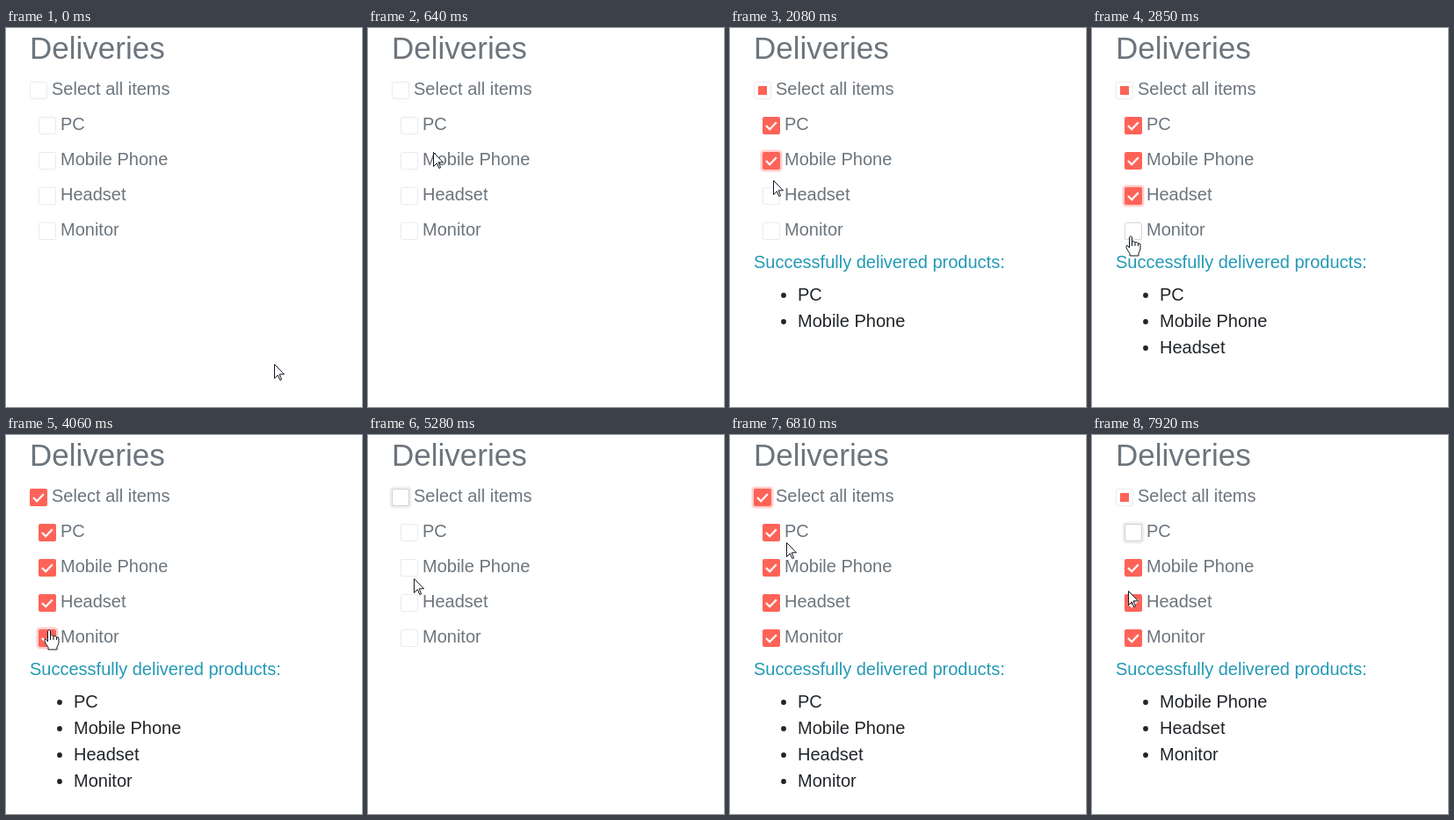
Recreate the animation shown at these times as an HTML page. Size 405 by 431 pixels, loop 8 s.

```html
<!DOCTYPE html>
<html lang="en">
<head>
<meta charset="utf-8">
<title>Deliveries</title>
<style>
  html, body { margin: 0; width: 100%; height: 100%; overflow: hidden; background: #fff; }
  svg { display: block; font: 20px "Liberation Sans", Arial, sans-serif; }
</style>
</head>
<body>
<svg id="stage" width="405" height="431" viewBox="0 0 405 431"></svg>
<script>
const LOOP = 8000, TICK = 110;
const GREY = '#6c757d', INFO = '#2399b5', DARK = '#212529', ACCENT = '#ff6358';
const ITEMS = ['PC', 'Mobile Phone', 'Headset', 'Monitor'];
const [ALL, PC, MOBILE, HEADSET, MONITOR] = [0, 1, 2, 3, 4];
const LEFT = 27, BOX = 20;

const ARROW = 'M.5.5V16.5L4.3 12.7 6.8 18.5 8.6 17.7 6.2 11.8H11.5Z';
const HAND = 'M-1.5 1.8Q0-.6 1.5 1.8V7Q4 5.5 5 8 7.5 6.5 8.5 9 11 8 11 11V15Q10.5 18 9 20V23H-1V20.5' +
  'Q-4 16.5-5 13.5-5.5 10.5-3.5 11.5L-1.5 14ZM1.5 7V12M5 8V12M8.5 9V12';

const boxOrigin = row => [row === ALL ? LEFT : LEFT + 10, 61 + 40 * row];

function inBox(row, dx = 10, dy = 12) {
  const [x, y] = boxOrigin(row);
  return [x + dx, y + dy];
}

// The script of the demo: pointer moves, clicks and pauses, one after another.
const moves = [], clicks = [];
let clock = 0, pointer = [305, 382];

const wait = ms => { clock += ms; };
const click = row => clicks.push({ time: clock, row });
function moveTo(to, ticks, bow = 0) {
  moves.push({ start: clock, from: pointer, to, ticks, bow });
  clock += ticks * TICK;
  pointer = to;
}

wait(100);
moveTo(inBox(PC), 5);
wait(220);
click(PC);
moveTo(inBox(MOBILE, 14, 11), 4);
wait(550);
click(MOBILE);
moveTo(inBox(HEADSET), 4);
wait(330);
click(HEADSET);
moveTo(inBox(MONITOR, 7, 15), 2);
wait(340);
click(MONITOR);
moveTo(inBox(MONITOR, 12, 0), 2);
wait(650);
moveTo(inBox(ALL), 4, -22);
click(ALL);
moveTo([52, 163], 4);
wait(330);
moveTo(inBox(ALL), 4, -22);
click(ALL);
moveTo([64, 122], 4);
moveTo([64, 122], 6, 118);
wait(120);
moveTo(inBox(PC), 3);
click(PC);
moveTo([41, 177], 6);

function pointerAt(t) {
  const { start, from, to, ticks, bow } = moves.findLast(m => m.start <= t) ?? { ...moves[0], start: t };
  const k = Math.min(1, Math.floor((t - start) / TICK) / ticks);
  const eased = k * k * (3 - 2 * k);
  const [x, y] = from.map((v, i) => v + (to[i] - v) * eased);
  return [Math.round(x + bow * Math.sin(Math.PI * k)), Math.round(y)];
}

function stateAt(t) {
  const checked = ITEMS.map(() => false);
  let focus = -1;
  for (const { time, row } of clicks) {
    if (time > t) break;
    if (row === ALL) checked.fill(!checked.every(Boolean));
    else checked[row - 1] = !checked[row - 1];
    focus = row;
  }
  return { checked, focus };
}

const text = (x, y, str, color, size = 20) =>
  `<text x="${x}" y="${y}" fill="${color}" font-size="${size}">${str}</text>`;

const square = (x, y, size, radius, attrs) =>
  `<rect x="${x}" y="${y}" width="${size}" height="${size}" rx="${radius}" ${attrs}/>`;

function checkbox(row, value, focused, hovered) {
  const [x, y] = boxOrigin(row);
  const on = value === 'on';
  let out = '';
  if (focused) {
    out += square(x - 2.5, y - 2.5, BOX + 5, 4.5,
      on ? `fill="${ACCENT}" fill-opacity=".3"` : 'fill="#000" fill-opacity=".06"');
  }
  if (on) {
    return out + square(x, y, BOX, 2, `fill="${ACCENT}"`) +
      `<path d="M${x + 4} ${y + 10}l4.2 4.2 7.6-8" fill="none" stroke="#fff" stroke-width="2.3"/>`;
  }
  out += square(x + .5, y + .5, BOX - 1, 1.5,
    `fill="#fff" stroke="#000" stroke-opacity="${focused || hovered ? .16 : .08}"`);
  if (value === 'some') out += square(x + 5, y + 5, 10, 0, `fill="${ACCENT}"`);
  return out;
}

function render(t) {
  const { checked, focus } = stateAt(t);
  const [px, py] = pointerAt(t);
  const all = checked.every(Boolean), some = checked.some(Boolean);
  const values = [all ? 'on' : some ? 'some' : 'off', ...checked.map(c => c ? 'on' : 'off')];
  const hovered = values.findIndex((_, row) => {
    const [x, y] = boxOrigin(row);
    return px >= x && px < x + BOX && py >= y && py < y + BOX;
  });

  let out = text(LEFT, 35, 'Deliveries', GREY, 35);
  ['Select all items', ...ITEMS].forEach((label, row) => {
    const [x, y] = boxOrigin(row);
    out += checkbox(row, values[row], row === focus, row === hovered);
    out += text(x + BOX + 5, y + 15, label, GREY);
  });

  if (some) {
    out += text(LEFT, 273, 'Successfully delivered products:', INFO);
    ITEMS.filter((_, i) => checked[i]).forEach((item, i) => {
      out += `<circle cx="61" cy="${304 + 30 * i}" r="2.9" fill="${DARK}"/>`;
      out += text(LEFT + 50, 310 + 30 * i, item, DARK);
    });
  }

  return out + `<path transform="translate(${px} ${py})" d="${hovered < 0 ? ARROW : HAND}"
    fill="#fff" stroke="#111822" stroke-linejoin="round"/>`;
}

const stage = document.getElementById('stage');
const startTime = performance.now();

function frame() {
  stage.innerHTML = render((performance.now() - startTime) % LOOP);
  requestAnimationFrame(frame);
}
frame();
</script>
</body>
</html>
```
